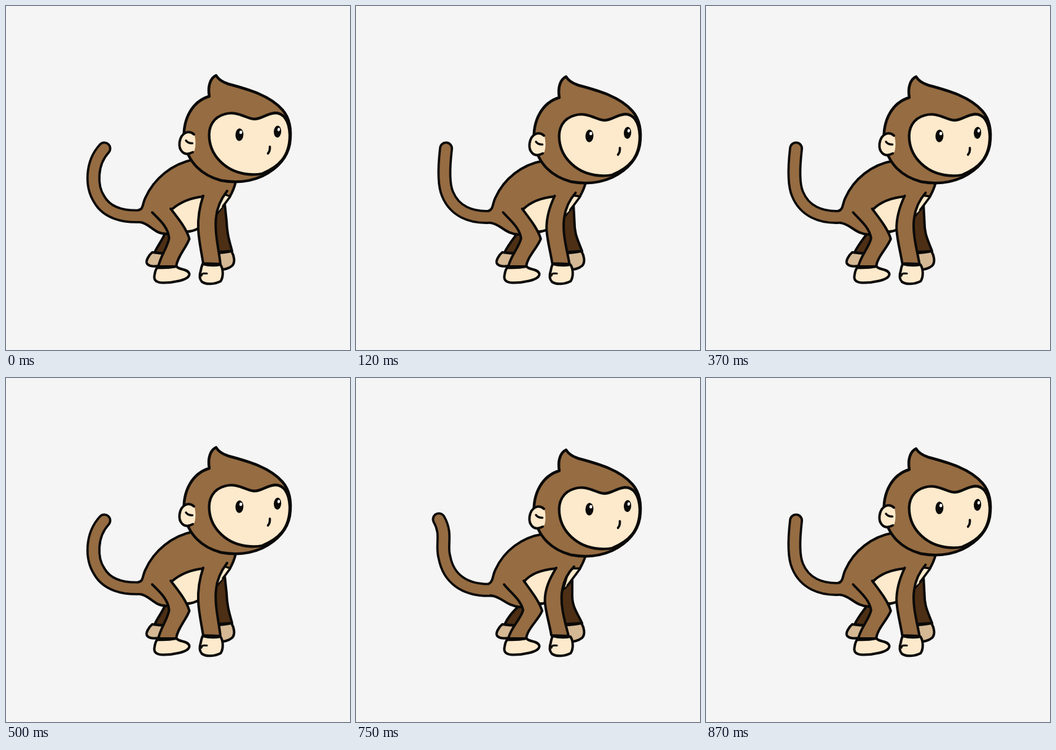
Recreate the animation shown at these times as an HTML page with a canvas. Size 560 px wide and 560 px high, loop 1000 ms.

```html
<!DOCTYPE html>
<html lang="en">
<head>
<meta charset="utf-8">
<title>Monkey</title>
<style>
  html, body { margin: 0; width: 100%; height: 100%; overflow: hidden; background: #f5f5f5; }
  canvas { display: block; }
</style>
</head>
<body>
<canvas id="stage" width="560" height="560"></canvas>
<script>
const ctx = document.getElementById('stage').getContext('2d');
const INK = '#0b0a09', BROWN = '#966c42', CREAM = '#fde9cb', TAN = '#d5b894', DARK = '#4d2f15';

// Three poses, swayed back and forth: 0 = up, 1 = middle, 2 = crouched
const SWAY = [0, 1, 2, 1];
const TAILS = [
  'M160,232 C138,256 138,294 152,315 C164,336 190,344 222,342',
  'M146.5,232 C143,262 142,290 149,306 C160,333 186,346 222,343',
  'M135,230 C149,254 138,272 144,292 C150,324 174,347 222,345'
];

function shape(d, fill, width = 4, ink = INK) {
  const path = new Path2D(d);
  if (fill) { ctx.fillStyle = fill; ctx.fill(path); }
  if (width) { ctx.lineWidth = width; ctx.strokeStyle = ink; ctx.stroke(path); }
}

function oval(x, y, rx, ry, fill) {
  ctx.beginPath();
  ctx.ellipse(x, y, rx, ry, 0.05, 0, Math.PI * 2);
  ctx.fillStyle = fill;
  ctx.fill();
}

function drawBody(pose) {
  const mix = (up, down) => up + (down - up) * pose / 2;
  const dy = pose * 2;

  // Far limbs
  shape(`M${mix(260, 268)},368 C254,382 247,390 242,401 L268,404 L280,368`, DARK);
  shape('M238,401 C233,405 226,416 230,420 C235,425 246,424 254,422 L264,403 Q250,403 238,401Z', TAN);
  shape(`M328,325 L336,401 L368,399 C${mix(363, 359)},380 ${mix(360, 351)},372 ${mix(359, 352)},350 L${mix(356, 352)},322`, DARK);
  shape('M338,402 Q356,402 367,399 C371,406 374,417 368,423 C362,428 355,429 345,430Z', TAN);

  // Tail
  shape(TAILS[pose], null, 23);
  shape(TAILS[pose], null, 15.5, BROWN);

  // Torso
  shape(`M216,${mix(332, 335)} C224,331 222,321 227,312 C241,281 270,${257 + dy / 2} 305,${250 + dy}
    L374,${286 + dy / 2} Q371,299 364,311 L${mix(353, 344)},${mix(326, 338)} L340,342 L${mix(313, 309)},${mix(362, 366)}
    C300,368 285,372 ${mix(262, 268)},${mix(371, 373)} C${mix(240, 244)},371 236,355 219,${mix(352, 354)}`, BROWN);
  shape(`M${mix(270, 274)},331 C285,318 302,312 ${mix(322, 326)},310 L${mix(313, 309)},${mix(362, 366)} Q303,368 290,367`, CREAM);
  shape(`M338,342 L${mix(354, 347)},${mix(306, 310)} L365,310 L${mix(353, 344)},${mix(326, 338)}`, CREAM, 3.4);

  // Near leg and foot
  shape(`M${mix(238, 241)},336 C250,348 ${mix(264, 268)},360 ${mix(265.5, 272)},378
    C${mix(263, 268)},393 252,406 248,424 L277,424
    C279,408 ${mix(293, 297)},394 ${mix(298.5, 303)},379 C${mix(294, 298)},363 ${mix(282, 286)},348 ${mix(268, 273)},330`, BROWN);
  shape(`M246,426 Q262,427 278,424 C281,430 296,427 298.5,436
    C299,447 268,451 254,450.5 C243,450 240,445 242,437 Q243,430 246,426Z`, CREAM);

  // Near arm and hand
  shape(`M${mix(321, 326)},309 C${mix(315, 315)},327 ${mix(312, 307)},344 ${mix(313, 307.5)},364
    C${mix(314, 309)},383 ${mix(318, 315)},400 ${mix(321, 318)},419 L${mix(349, 346)},420
    C${mix(347, 341)},399 ${mix(339, 331)},369 ${mix(342, 336)},344
    Q${mix(344, 340)},322 ${mix(360, 355)},${mix(301, 307)}`, BROWN);
  shape(`M320,420 Q335,424 349,421 C354,428 354,441 349.5,448
    C340,453 326,454 319,449 C314,444 315,437 317,431 Q318,425 320,420Z`, CREAM);
  shape('M318,439 C319,435 322,435 327,435.5', null, 3.2);
}

function drawHead() {
  shape(`M331,147 C328,130 333,117 342,113 C346,120 353,124 362,127
    C396,136 430,146 450,169 C463,184 465,203 462,224 C457,252 437,267 417,277
    C395,287 372,288 350,284 C320,276 296,256 290,220 C287,183 304,155 331,147Z`, BROWN, 4.5);
  shape(`M404,184 C390,183 377,170 356,176 C337,181 329,197 331,216
    C334,246 360,271 395,274 Q407,275 417,273 C443,262 462,246 462,210
    C461,185 451,174 438,174 C422,176 416,184 404,184Z`, CREAM, 4.3);

  // Ear, open on the cheek side
  shape('M307,210 C298,202 285,205 282.5,222 C281,236 290,243 299,240 Q304,239 307,235 Q310,223 307,210', CREAM, 0);
  shape('M306,209 C298,202 285,205 282.5,222 C281,236 290,243 299,240 L304,238', null, 4);
  shape('M293,219 C295,222 299,223.5 303.5,223.5', null, 3.4);

  oval(380, 209.5, 6.5, 10.3, INK);
  oval(382.3, 205.5, 2.3, 2.8, '#fff');
  oval(442, 204.5, 6, 9.7, INK);
  oval(444, 201, 2.1, 2.8, '#fff');
  shape('M429.5,229 C430,234 429,237 426.5,240', null, 3.7);
}

function frame(now) {
  // Pose changes fall on whole hundredths of a second
  const t = Math.floor(now % 1000 / 10) * 10;
  const pose = SWAY[Math.floor((t + 5) / 125) % 4];
  ctx.fillStyle = '#f5f5f5';
  ctx.fillRect(0, 0, 560, 560);
  ctx.lineCap = ctx.lineJoin = 'round';
  drawBody(pose);
  ctx.save();
  ctx.translate(0, pose * 2);
  drawHead();
  ctx.restore();
  requestAnimationFrame(frame);
}
frame(performance.now());
</script>
</body>
</html>
```
